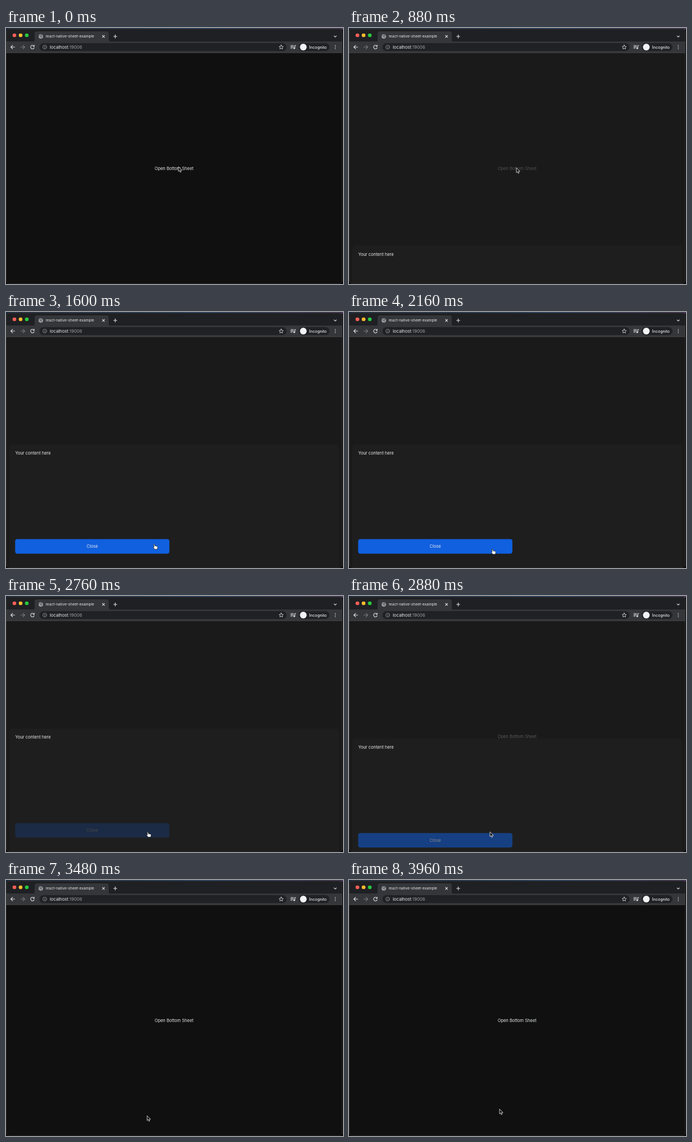
Write an HTML page that moves like this. It is 600x456 px and loops after 4080 ms.

```html
<!DOCTYPE html>
<html lang="en">
<head>
<meta charset="utf-8">
<title>Bottom sheet demo</title>
<style>
  html, body { margin: 0; width: 100%; height: 100%; overflow: hidden; background: #000; }
  svg { display: block; width: 600px; height: 456px; }
  text { font: 7.5px Inter, Roboto, sans-serif; fill: #e8eaed; }
  .icon { fill: none; stroke: #dfe1e5; stroke-width: 1.1; stroke-linecap: round; stroke-linejoin: round; }
</style>
</head>
<body>
<svg viewBox="0 0 600 456">
  <defs>
    <linearGradient id="desktop">
      <stop offset="0" stop-color="#16283f"/>
      <stop offset=".6" stop-color="#234a78"/>
      <stop offset="1" stop-color="#4a3358"/>
    </linearGradient>
    <clipPath id="window"><rect x=".5" y="1" width="598" height="454" rx="5"/></clipPath>
  </defs>

  <rect width="600" height="456" fill="#060606"/>
  <rect width="600" height="3" fill="url(#desktop)"/>

  <g clip-path="url(#window)">
    <rect y="1" width="600" height="455" fill="#101010"/>

    <!-- Page -->
    <text id="open" x="299.2" y="252.7" text-anchor="middle">Open Bottom Sheet</text>
    <rect id="backdrop" y="44" width="600" height="412" fill="#1e1e1e"/>
    <g id="sheet">
      <rect x="6" y="236" width="587" height="230" rx="5" fill="#1e1e1e"/>
      <text x="16.4" y="254.3">Your content here</text>
      <g id="close">
        <rect x="16.3" y="404.6" width="274.6" height="25.8" rx="4" fill="#1060df"/>
        <text x="153.5" y="420.3" text-anchor="middle">Close</text>
      </g>
    </g>

    <!-- Tab strip -->
    <rect y="1" width="600" height="24" fill="#1f2023"/>
    <circle cx="15" cy="13" r="3.3" fill="#ff5f57"/>
    <circle cx="26" cy="13" r="3.3" fill="#febc2e"/>
    <circle cx="37" cy="13" r="3.3" fill="#28c840"/>
    <path d="M47 25Q51 25 51 21V10Q51 6 55 6H179Q183 6 183 10V21Q183 25 187 25Z" fill="#35363a"/>
    <circle cx="62" cy="15" r="4" fill="#9aa0a6"/>
    <path d="M59 13.2L61 15.2H63V17.2M62 11.5V13H65.2" fill="none" stroke="#35363a"/>
    <text x="70.5" y="17.4" style="font-size:6.55px">react-native-sheet-example</text>
    <path class="icon" d="M171.8 13.2L175.4 16.8M175.4 13.2L171.8 16.8M191.5 15H197.5M194.5 12V18M584.2 14.2L586.2 16.2L588.2 14.2"/>

    <!-- Toolbar -->
    <rect y="24" width="600" height="20" fill="#35363a"/>
    <rect y="43.5" width="600" height="1" fill="#47484b"/>
    <rect x="59.5" y="27" width="440" height="14" rx="7" fill="#202124"/>
    <rect x="521" y="27" width="55" height="14" rx="7" fill="#202124"/>
    <path class="icon" d="M15.5 34H8.8M11.8 30.8L8.6 34L11.8 37.2"/>
    <path class="icon" style="stroke:#77797d" d="M26.5 34H33.2M30.2 30.8L33.4 34L30.2 37.2"/>
    <path class="icon" d="M49.6 32A3.2 3.2 0 1 0 50.1 35M50.2 30.6V32.8H48"/>
    <g class="icon" style="stroke-width:.8">
      <circle cx="69" cy="34" r="3.4" stroke="#9aa0a6"/>
      <path stroke="#9aa0a6" d="M69 33.8V35.8M69 32.2V32.3"/>
      <path d="M490 30.2L491.1 32.7L493.8 33L491.8 34.8L492.4 37.5L490 36.1L487.6 37.5L488.2 34.8L486.2 33L488.9 32.7Z"/>
    </g>
    <text x="78" y="36.7" style="font-size:7.7px">localhost<tspan fill="#9aa0a6">:19006</tspan></text>
    <path class="icon" d="M507 31.2H512M507 33.6H512M507 36H509.5M514.2 36V31.2H515.8"/>
    <circle cx="513" cy="36.2" r="1.4" fill="#dfe1e5"/>
    <circle cx="529.3" cy="34" r="6" fill="#f1f3f4"/>
    <text x="539.8" y="36.6" style="font-size:7px;font-weight:500">Incognito</text>
    <path class="icon" style="stroke-width:1.6" d="M586.3 31.2V31.2M586.3 34V34M586.3 36.8V36.8"/>
  </g>
  <rect x=".5" y="1.5" width="598" height="454" rx="5" fill="none" stroke="#777" stroke-opacity=".28"/>

  <g id="cursor" stroke-linejoin="round">
    <path id="arrow" d="M0 0V8.6L2 6.8L3.4 10L4.8 9.3L3.5 6.3H6.2Z" fill="#111" stroke="#eee" stroke-width=".8"/>
    <path id="hand" d="M.2 .6Q1.2 -.3 1.8 .8L2.5 3.3L6.4 4.2Q7.7 4.7 7.3 6.4L6.5 9.6H2.4L-.8 6.5Q-1.4 5.3 .9 5.8Z" fill="#f4f4f4" stroke="#111" stroke-width=".7"/>
  </g>
</svg>
<script>
const LOOP = 4080, STEP = 40;
const SHEET_HEIGHT = 220, SLIDE = 344, OPEN_AT = 744, CLOSE_AT = 2811;

// Cursor stops: time, x, y
const path = [
  [0, 307, 247], [560, 298, 249], [1040, 298, 249], [1120, 280, 275], [1680, 262, 419],
  [1760, 261, 420], [2160, 254, 422], [2280, 254, 422], [2400, 251, 420],
  [3440, 251, 420], [3960, 268, 408], [LOOP, 268, 408]
];

const $ = id => document.getElementById(id);
const clamp = v => Math.min(1, Math.max(0, v));
const ramp = (t, start, length) => clamp((t - start) / length);
const inOutQuad = p => p < .5 ? 2 * p * p : 1 - 2 * (1 - p) ** 2;
const mix = (a, b, p) => a + (b - a) * p;

// Opacity of a touchable that dims while pressed
const pressed = (t, down, up) => 1 - .8 * (ramp(t, down, 120) - ramp(t, up, 200));

function cursorAt(t) {
  const i = path.findIndex(stop => stop[0] > t);
  const [t0, x0, y0] = path[i - 1], [t1, x1, y1] = path[i];
  const p = inOutQuad((t - t0) / (t1 - t0));
  return [mix(x0, x1, p), mix(y0, y1, p)];
}

function draw(t) {
  const shown = inOutQuad(ramp(t, OPEN_AT, SLIDE)) - inOutQuad(ramp(t, CLOSE_AT, SLIDE));
  const offset = (1 - shown) * SHEET_HEIGHT;
  const [x, y] = cursorAt(t);
  const overButton = x > 16 && x < 291 && y > 404.6 + offset && y < 430.4 + offset;

  $('open').style.opacity = pressed(t, 600, 720);
  $('close').style.opacity = pressed(t, 2600, 2800);
  $('backdrop').style.opacity = .71 * clamp(shown / .3);
  $('sheet').setAttribute('transform', `translate(0 ${offset})`);
  $('cursor').setAttribute('transform', `translate(${x} ${y})`);
  $('arrow').style.display = overButton ? 'none' : '';
  $('hand').style.display = overButton ? '' : 'none';
}

const start = performance.now();
function tick() {
  const t = (performance.now() - start) % LOOP;
  draw(Math.floor(t / STEP) * STEP);
  requestAnimationFrame(tick);
}
tick();
</script>
</body>
</html>
```
